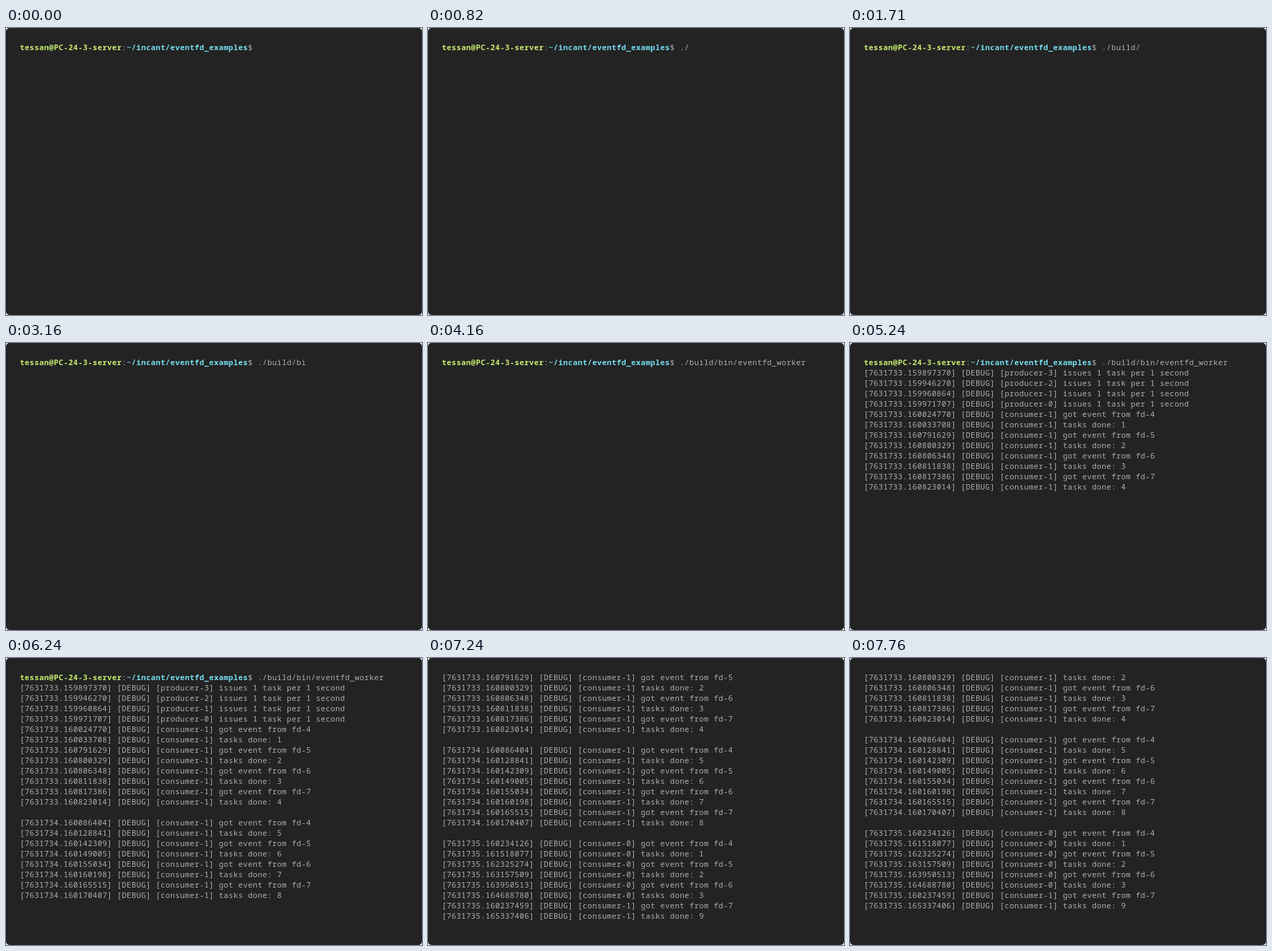
An HTML page that plays this animation: 600 px wide and 415 px high, repeating every 8000 ms.

```html
<!DOCTYPE html>
<html lang="en">
<head>
<meta charset="utf-8">
<title>eventfd worker</title>
<style>
  html, body { margin: 0; width: 100%; height: 100%; overflow: hidden; background: #fff; }
  #window { position: absolute; inset: 0; border-radius: 5px; background: #232323; }
  #view { position: absolute; inset: 21px 0 0; overflow: hidden; }
  pre {
    position: absolute; left: 20px; top: -1px; margin: 0;
    font: 11px/15px "Noto Sans Mono", "DejaVu Sans Mono", monospace;
    letter-spacing: calc(7px - 1ch); /* terminal cells are 7px wide */
    color: #afafaf;
    animation: scroll 8s step-end infinite;
  }
  b { color: #c8ed71; }
  b + b { color: #75dff2; }
  #typed { display: inline-block; height: 15px; vertical-align: top; animation: type 8s step-end infinite; }
  .out { visibility: hidden; animation: 8s step-end infinite; }
  #run1 { animation-name: show1; }
  #run2 { animation-name: show2; }
  #run3 { animation-name: show3; }

  /* 182px hides the whole command, 7px per character */
  @keyframes type {
    0%      { clip-path: inset(0 182px 0 0); }
    8.75%   { clip-path: inset(0 175px 0 0); }
    10.25%  { clip-path: inset(0 168px 0 0); }
    14.75%  { clip-path: inset(0 161px 0 0); }
    21.375% { clip-path: inset(0 126px 0 0); }
    38.5%   { clip-path: inset(0 119px 0 0); }
    39.5%   { clip-path: inset(0 112px 0 0); }
    41.375% { clip-path: inset(0 105px 0 0); }
    42.625% { clip-path: inset(0 98px 0 0); }
    47.875% { clip-path: inset(0 91px 0 0); }
    50.125% { clip-path: inset(0 84px 0 0); }
    52%, to { clip-path: inset(0); }
  }
  @keyframes show1 { 0% { visibility: hidden; } 65.5%, to { visibility: visible; } }
  @keyframes show2 { 0% { visibility: hidden; } 78%, to { visibility: visible; } }
  @keyframes show3 { 0% { visibility: hidden; } 90.5%, to { visibility: visible; } }
  @keyframes scroll {
    0%      { transform: none; }
    90.5%   { transform: translateY(-105px); }
    97%, to { transform: translateY(-120px); }
  }
</style>
</head>
<body>
<div id="window"><div id="view"><pre><b>tessan@PC-24-3-server</b>:<b>~/incant/eventfd_examples</b>$ <span id="typed">./build/bin/eventfd_worker</span>
<span id="run1" class="out">[7631733.159897370] [DEBUG] [producer-3] issues 1 task per 1 second
[7631733.159946270] [DEBUG] [producer-2] issues 1 task per 1 second
[7631733.159960864] [DEBUG] [producer-1] issues 1 task per 1 second
[7631733.159971707] [DEBUG] [producer-0] issues 1 task per 1 second
[7631733.160024770] [DEBUG] [consumer-1] got event from fd-4
[7631733.160033708] [DEBUG] [consumer-1] tasks done: 1
[7631733.160791629] [DEBUG] [consumer-1] got event from fd-5
[7631733.160800329] [DEBUG] [consumer-1] tasks done: 2
[7631733.160806348] [DEBUG] [consumer-1] got event from fd-6
[7631733.160811838] [DEBUG] [consumer-1] tasks done: 3
[7631733.160817386] [DEBUG] [consumer-1] got event from fd-7
[7631733.160823014] [DEBUG] [consumer-1] tasks done: 4
</span>
<span id="run2" class="out">[7631734.160086404] [DEBUG] [consumer-1] got event from fd-4
[7631734.160128841] [DEBUG] [consumer-1] tasks done: 5
[7631734.160142309] [DEBUG] [consumer-1] got event from fd-5
[7631734.160149005] [DEBUG] [consumer-1] tasks done: 6
[7631734.160155034] [DEBUG] [consumer-1] got event from fd-6
[7631734.160160198] [DEBUG] [consumer-1] tasks done: 7
[7631734.160165515] [DEBUG] [consumer-1] got event from fd-7
[7631734.160170407] [DEBUG] [consumer-1] tasks done: 8
</span>
<span id="run3" class="out">[7631735.160234126] [DEBUG] [consumer-0] got event from fd-4
[7631735.161518077] [DEBUG] [consumer-0] tasks done: 1
[7631735.162325274] [DEBUG] [consumer-0] got event from fd-5
[7631735.163157509] [DEBUG] [consumer-0] tasks done: 2
[7631735.163950513] [DEBUG] [consumer-0] got event from fd-6
[7631735.164688780] [DEBUG] [consumer-0] tasks done: 3
[7631735.160237459] [DEBUG] [consumer-1] got event from fd-7
[7631735.165337406] [DEBUG] [consumer-1] tasks done: 9</span>
</pre></div></div>
</body>
</html>
```
